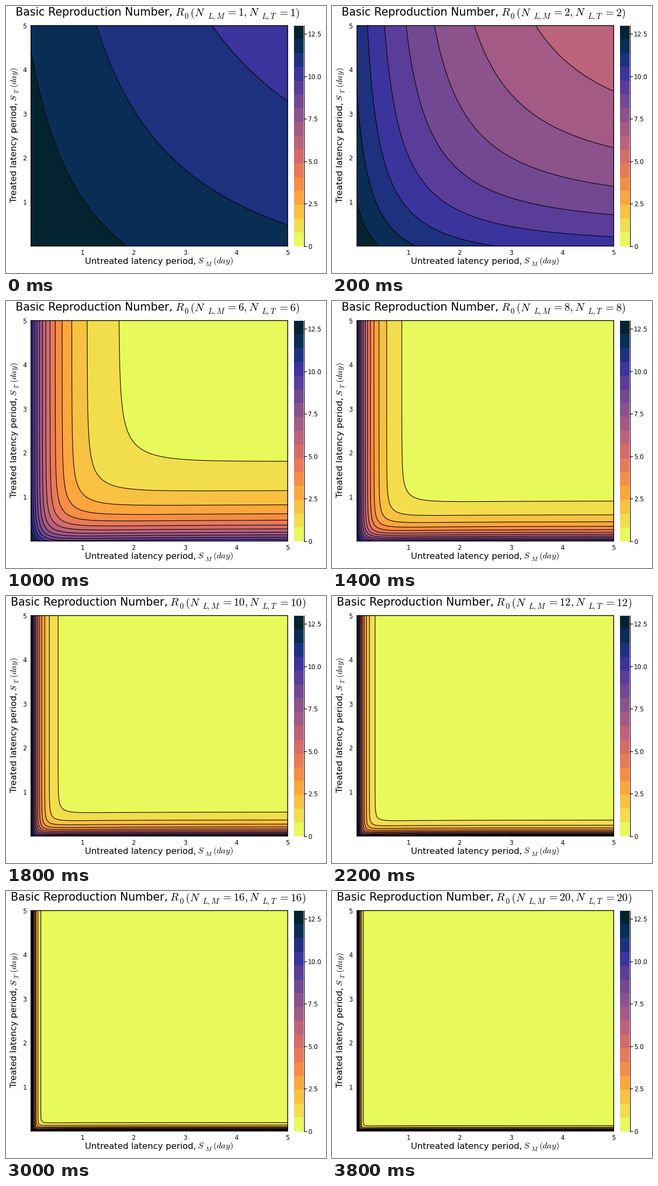
A matplotlib script for the animation above (4000 ms loop, 600 by 500 pixels).

```python
import numpy as np
import matplotlib.pyplot as plt
from matplotlib.animation import FuncAnimation
from matplotlib.colors import LinearSegmentedColormap, ListedColormap

W, H, DPI = 600, 500, 100
PX = 72 / DPI  # points per pixel
LEFT, RIGHT, TOP, BOTTOM = 46.8, 528.2, 36.6, 449.6

plt.rcParams.update({"font.family": "DejaVu Sans", "mathtext.fontset": "cm"})

THERMAL = [(3, 35, 48), (13, 48, 100), (50, 50, 158), (93, 62, 153),
           (126, 77, 143), (158, 89, 135), (193, 100, 121), (225, 113, 97),
           (246, 139, 69), (253, 173, 60), (246, 211, 70), (232, 250, 91)]
LEVELS = np.linspace(0, 13, 17)
ramp = LinearSegmentedColormap.from_list("thermal", np.array(THERMAL[::-1]) / 255)
bands = ListedColormap(ramp(np.linspace(0, 1, 16)))

# Latency model: death rate, and exit rate of the first untreated stage
DEATH, EXIT = 0.1193, 0.2115
grid = np.linspace(0.001, 5, 101)
SM, ST = np.meshgrid(grid, grid)


def reproduction(n):
    first = 1 / (1 + EXIT * n * SM)
    untreated = first * (1 + DEATH * n * SM) ** (1 - n)
    treated = (1 + DEATH * n * ST) ** -n
    return np.sqrt(113.7 * untreated + (53.2 + 49 * (1 - first)) * treated)


fig = plt.figure(figsize=(W / DPI, H / DPI), dpi=DPI, facecolor="white")
page = fig.add_axes([0, 0, 1, 1])
page.set(xlim=(0, W), ylim=(H, 0))
page.axis("off")
ax = fig.add_axes([LEFT / W, 1 - BOTTOM / H,
                   (RIGHT - LEFT) / W, (BOTTOM - TOP) / H])


def label(x, y, s, size, ha="center", va="baseline", **kw):
    return page.text(x, y, s, fontsize=size * PX, ha=ha, va=va, **kw)


def line(xs, ys):
    page.plot(xs, ys, color="black", lw=1.2 * PX, solid_capstyle="butt")


def chain(x, y, size, prose, runs, upright=False):
    """Prose followed by math runs (text, gap, is_subscript), end to end."""
    turn = dict(rotation=90 if upright else 0, rotation_mode="anchor")
    parts = [label(x, y, prose, size, ha="left", **turn)]
    for s, gap, sub in runs:
        drop = 0.27 * size if sub else 0
        prev = parts[-1]
        if upright:
            at, coords, shift = (x, 1), ("data", prev), (drop, gap)
        else:
            at, coords, shift = (1, y), (prev, "data"), (gap, -drop)
        parts.append(page.annotate(
            f"${s}$", at, xycoords=coords, textcoords="offset pixels",
            xytext=shift, fontsize=size * PX * (0.7 if sub else 1),
            ha="left", va="baseline", annotation_clip=False, **turn))
    return parts


def title_runs(n):
    return [("R", 4, False), ("0", 0, True), ("(N", 2, False),
            ("L,M", 4, True), (f"= {n}, N", 1, False),
            ("L,T", 4, True), (f"= {n})", 1, False)]


def axis_runs(group):
    return [("S", 3, False), (group, 1, True), ("(day)", 1, False)]


title = chain(18.5, 18.5, 20.7, "Basic Reproduction Number,", title_runs(1))
chain(147.8, 482.5, 16.3, "Untreated latency period,", axis_runs("M"))
chain(20, 368.5, 16.3, "Treated latency period,", axis_runs("T"), upright=True)

for k in range(1, 6):
    label(LEFT + (RIGHT - LEFT) * k / 5, 465.5, str(k), 11.8)
    label(39, BOTTOM - (BOTTOM - TOP) * k / 5, str(k), 11.8,
          ha="right", va="center_baseline")

# Colour bar
step = (BOTTOM - TOP) / 16
for i in range(16):
    page.add_patch(plt.Rectangle((540, BOTTOM - (i + 1) * step), 18, step,
                                 color=bands(i), lw=0))
line([558.5, 558.5], [TOP - 0.5, BOTTOM + 0.5])
for v in (0, 2.5, 5.0, 7.5, 10.0, 12.5):
    y = BOTTOM - (BOTTOM - TOP) * v / 13
    line([558, 564], [y, y])
    label(566, y, str(v), 11.8, ha="left", va="center_baseline")


def draw(i):
    n = i + 1
    title[0].set_x(28 - 9.5 * len(str(n)))
    for part, (s, _, _) in zip(title[1:], title_runs(n)):
        part.set_text(f"${s}$")
    z = reproduction(n)
    ax.clear()
    ax.contourf(SM, ST, z, levels=LEVELS, colors=bands.colors)
    ax.contour(SM, ST, z, levels=LEVELS[1:-1], colors="black", linewidths=1.1 * PX)
    ax.set(xlim=(grid[0], 5), ylim=(grid[0], 5), xticks=[], yticks=[])
    for spine in ax.spines.values():
        spine.set_linewidth(1.4 * PX)
        spine.set_snap(False)
    return []


anim = FuncAnimation(fig, draw, frames=20, interval=200, repeat=True,
                     repeat_delay=0, init_func=lambda: draw(0))
plt.show()
```
